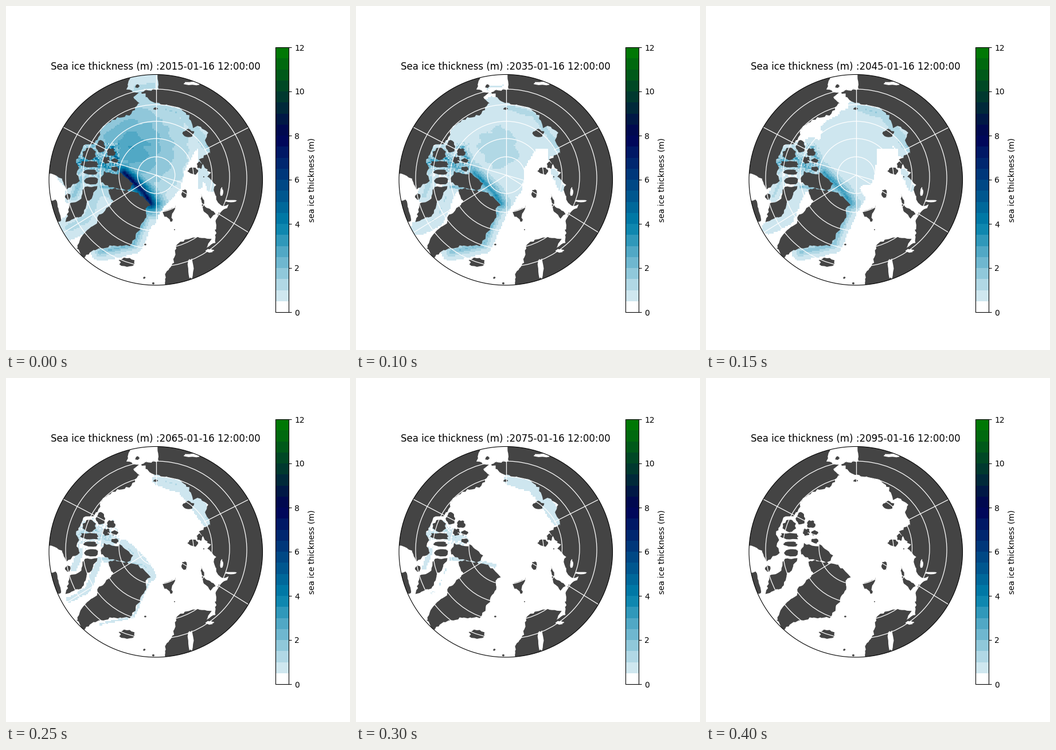
A matplotlib script that plays this animation: 600x600 px, repeating every 0.45 s.

```python
import numpy as np
import matplotlib.pyplot as plt
from matplotlib.animation import FuncAnimation
from matplotlib.cm import ScalarMappable
from matplotlib.colors import BoundaryNorm, ListedColormap
from matplotlib.patches import Ellipse, Polygon

SIZE, DPI = 600, 100
FRAMES, STEP_MS = 9, 50
LAND = "#444444"
POLE = (262, 295)
KEY_YEARS = [2015, 2025, 2045, 2055, 2075, 2095]

rng = np.random.default_rng(7)

# Ice held along a path: points, fall-off in px, metres in the key years
BANDS = [
    ([(185, 248), (203, 288)], 13, (3.6, 2.4, 2, .8, 0)),
    ([(206, 292), (238, 323), (253, 345)], 14, (7.8, 3.8, 3.2, 1.6, .4)),
    ([(252, 350), (222, 417), (165, 430)], 11, (2.2, 2.2, 2, 1.2, 0)),
    ([(165, 316), (205, 320), (242, 328)], 5, (2.5, 2.2, 2, 1.5, 1)),
    ([(268, 178), (310, 190), (352, 248)], 18, (1.5, 1.1, 1.5, 1.1, .9)),
    ([(345, 290), (358, 318)], 12, (.9, .8, .8, .5, .4)),
    ([(162, 320), (142, 370), (110, 388)], 20, (1.4, 1.1, .9, .8, .5)),
    ([(124, 275), (150, 264), (181, 284)], 18, (3.2, 2.7, 2.3, 1.3, .8)),
    ([(130, 303), (118, 332)], 12, (2, 1.6, 1.2, .9, .7)),
    ([(238, 161), (228, 143), (256, 140)], 12, (1.5, .9, .2, 0, 0)),
    ([(238, 267), (260, 260), (282, 264)], 14, (1, .8, .7, .7, 0)),
]

EURASIA = [
    (264, 110), (266, 145), (235, 149), (250, 164), (268, 172), (300, 177),
    (320, 192), (329, 212), (340, 211), (354, 221), (346, 233), (357, 254),
    (337, 268), (355, 290), (352, 297), (366, 312), (361, 322), (373, 347),
    (388, 348), (368, 364), (365, 412), (350, 422), (359, 406), (325, 404),
    (303, 411), (296, 424), (293, 447), (278, 468), (278, 500), (480, 500),
    (480, 110),
]
AMERICA = [
    (223, 112), (210, 145), (232, 152), (219, 160), (233, 168), (218, 188),
    (186, 199), (170, 210), (154, 239), (135, 242), (122, 274), (128, 283),
    (123, 289), (128, 307), (105, 319), (97, 300), (60, 286), (60, 110),
]
GREENLAND = [
    (178, 322), (190, 318), (230, 325), (251, 346), (243, 353), (245, 365),
    (222, 408), (215, 417), (178, 419), (152, 427), (136, 438), (124, 425),
    (131, 400), (158, 378), (160, 368), (187, 342),
]
BAFFIN = [
    (133, 317), (159, 315), (131, 367), (105, 375), (112, 346), (131, 336),
]
ELLESMERE = [
    (199, 289), (220, 309), (213, 320), (182, 316), (165, 306), (171, 288),
    (190, 294),
]
NOVAYA = [(341, 327), (350, 352), (366, 363), (357, 370), (341, 352)]
SVALBARD = [(275, 360), (297, 350), (289, 367), (291, 377), (277, 367)]
QUEBEC = [(70, 340), (86, 338), (92, 354), (97, 376), (70, 378)]

# Islands as x, y, width, height
ISLES = [
    (165, 245, 16, 20), (183, 255, 14, 14), (145, 258, 23, 20),
    (146, 276, 36, 13), (175, 269, 13, 12), (190, 270, 11, 9),
    (190, 284, 13, 9), (148, 290, 24, 9), (147, 305, 25, 15),
    (108, 332, 9, 11), (318, 222, 19, 15), (311, 328, 9, 17),
    (327, 288, 18, 12), (338, 278, 10, 12), (211, 447, 28, 18),
    (261, 179, 8, 4), (229, 140, 7, 6), (243, 416, 4, 3),
    (294, 390, 2, 2), (241, 474, 4, 4), (257, 484, 4, 4), (345, 298, 2, 2),
]
GULFS = [(322, 458, 10, 33), (355, 427, 14, 6), (376, 324, 5, 16),
         (392, 340, 20, 4), (325, 135, 32, 6)]


def rough(points, amount=1.1, gap=4):
    """Break a closed outline into short, slightly ragged pieces."""
    pts = np.array(points, float)
    out = []
    for a, b in zip(pts, np.roll(pts, -1, axis=0)):
        n = max(1, int(np.hypot(*(b - a)) / gap))
        t = np.arange(n)[:, None] / n
        out.append(a + (b - a) * t + rng.normal(0, amount, (n, 2)))
    return np.vstack(out)


def blob(x, y, w, h):
    a = np.linspace(0, 2 * np.pi, 16, endpoint=False)
    r = rng.uniform(.75, 1.2, a.size) / 2
    return np.column_stack([x + w * r * np.cos(a), y + h * r * np.sin(a)])


def path_distance(x, y, path):
    best = np.full(x.shape, 1e9)
    for (px, py), (qx, qy) in zip(path, path[1:]):
        dx, dy = qx - px, qy - py
        t = np.clip(((x - px) * dx + (y - py) * dy) / (dx**2 + dy**2), 0, 1)
        best = np.minimum(best, np.hypot(x - px - t * dx, y - py - t * dy))
    return best


# Ice model on a coarse grid
CELL = 2.5
gx, gy = np.meshgrid(np.arange(70, 452, CELL) + CELL / 2,
                     np.arange(115, 492, CELL) + CELL / 2)
falloffs = [np.exp(-path_distance(gx, gy, p) / w) for p, w, _ in BANDS]
ripple = 1 + .06 * np.sin(gx / 7 + 2 * np.sin(gy / 11)) * np.cos(gy / 6)
channels = (gx > 120) & (gx < 198) & (gy > 240) & (gy < 300)
ripple = np.where(channels, ripple * rng.uniform(.6, 1.5, gx.shape), ripple)


def at(year, values):
    """Value between the key years; everything has melted by the last."""
    return np.interp(year, KEY_YEARS, [*values, 0])


def front(year):
    """Eastern ice limit at each height on the Atlantic side."""
    heights = [250, 285, 320, 360, 400]
    early = [332, 312, 304, 268, 254]
    mid = [330, 290, 293, 266, 247]
    late = [297, 296, 288, 264, 247]
    x = [np.interp(year, KEY_YEARS[:3], v) for v in zip(early, mid, late)]
    return np.interp(gy, heights, x)


def thickness(year):
    # Pack ice: a broad mound that thins and drifts toward Siberia
    cx = np.interp(year, KEY_YEARS[:3], [220, 236, 262])
    r = np.hypot(gx - cx, gy - 248)
    ice = at(year, (2.9, 1.55, .92, .3, 0)) * np.exp(-(r / 95)**1.5)
    for fall, (_, _, metres) in zip(falloffs, BANDS):
        ice = np.maximum(ice, fall * at(year, metres))
    ice = ice * ripple
    ice[(gy > 250) & (gx < 335) & (gx > front(year))] = 0
    return np.clip(ice, 0, 11.9)


levels = np.arange(0, 12.5, .5)
shades = plt.get_cmap("ocean_r")((levels[:-1] + .25) / 12)
shades[0] = 1
cmap = ListedColormap(shades)
norm = BoundaryNorm(levels, cmap.N)

fig = plt.figure(figsize=(SIZE / DPI, SIZE / DPI), dpi=DPI, facecolor="white")
ax = fig.add_axes([0, 0, 1, 1])
ax.axis("off")

disc = Ellipse((261.25, 303.25), 372.5, 367.5, fc="white", ec="none", zorder=0)
ax.add_patch(disc)
sheet = ax.imshow(thickness(2015), cmap=cmap, norm=norm, aspect="auto",
                  interpolation="nearest", zorder=1,
                  extent=(70, 70 + CELL * gx.shape[1],
                          115 + CELL * gx.shape[0], 115))
sheet.set_clip_path(disc)
ax.set_xlim(0, SIZE)
ax.set_ylim(SIZE, 0)


def add_clipped(patch):
    ax.add_patch(patch)
    patch.set_clip_path(disc)


coasts = [EURASIA, AMERICA, GREENLAND, BAFFIN, ELLESMERE, NOVAYA, SVALBARD,
          QUEBEC]
for shape in [rough(c) for c in coasts] + [blob(*i) for i in ISLES]:
    add_clipped(Polygon(shape, fc=LAND, ec="none", zorder=2))
for gulf in GULFS:
    add_clipped(Polygon(blob(*gulf), fc="white", ec="none", zorder=3))

# Parallels and meridians
for cy, rx, ry in [(295, 32.7, 32), (295.5, 65, 64.3), (296.7, 97.5, 95.6),
                   (298, 128, 126), (300, 158, 155)]:
    add_clipped(Ellipse((262, cy), 2 * rx, 2 * ry, fc="none", ec="white",
                        lw=.9, zorder=4))
meridians = [
    [(262, 119), (262, 487)],
    [(99, 211), (176, 251)], [(423, 212), (346, 251)],
    [(99, 396), POLE], [(423, 395), POLE],
    [(178, 270), POLE, (310, 309)],
]
for line in meridians:
    ax.plot(*zip(*line), color="white", lw=.9, zorder=4, clip_path=disc)
ax.add_patch(Ellipse(disc.center, disc.width, disc.height, fc="none",
                     ec="black", lw=.8, zorder=5))

title = ax.text(261, 111, "", fontsize=12, ha="center", va="baseline")

cax = fig.add_axes([470.25 / SIZE, .11, 23.1 / SIZE, .77])
bar = fig.colorbar(ScalarMappable(norm, cmap), cax=cax,
                   ticks=range(0, 13, 2), spacing="proportional")
bar.ax.minorticks_off()
bar.set_label("sea ice thickness (m)")


def draw(i):
    year = 2015 + 10 * i
    sheet.set_data(thickness(year))
    title.set_text(f"Sea ice thickness (m) :{year}-01-16 12:00:00")
    return sheet, title


anim = FuncAnimation(fig, draw, frames=FRAMES, interval=STEP_MS, repeat=True)
plt.show()
```
